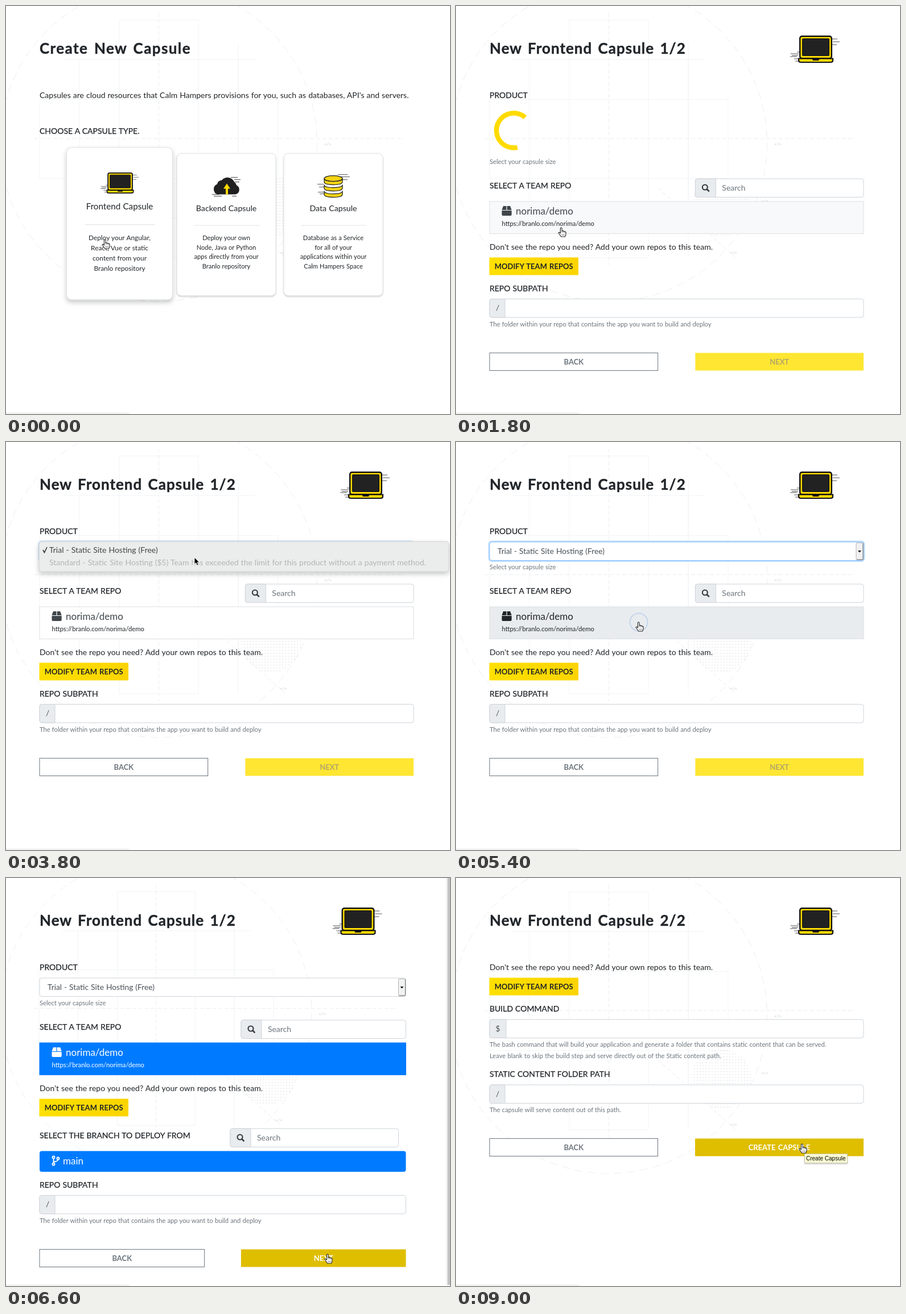
Write an HTML page that moves like this. It is 780 by 718 pixels and loops after 9200 ms.

```html
<!DOCTYPE html>
<html lang="en">
<head>
<meta charset="utf-8">
<title>Create New Capsule</title>
<style>
html, body { margin: 0; width: 100%; height: 100%; overflow: hidden; background: #fff; }
svg { display: block; width: 780px; height: 718px; }
text { font: 14px Lato, sans-serif; word-spacing: .03em; fill: #212529; white-space: pre; }
.title { font-size: 26px; font-weight: 700; word-spacing: 3px; letter-spacing: 1px; stroke: #212529; stroke-width: .4px; }
.wide { letter-spacing: 1.4px; }
.head { font-size: 14px; stroke: #212529; stroke-width: .25px; }
.help { font-size: 11.2px; fill: #6c757d; }
.btn { font-size: 13px; font-weight: 700; word-spacing: 1px; text-anchor: middle; }
.repo { font-size: 17px; }
.url { font-size: 11.3px; }
.field { font-size: 13.8px; fill: #495057; }
.name { font-size: 14.2px; text-anchor: middle; }
.desc { font-size: 11.1px; text-anchor: middle; }
.tip { font: 10px "Liberation Sans", Arial, sans-serif; word-spacing: 0; fill: #000; }
</style>
</head>
<body>
<svg viewBox="0 0 780 718">
  <defs>
    <linearGradient id="gold"><stop stop-color="#ffe000"/><stop offset="1" stop-color="#fbd400"/></linearGradient>
    <pattern id="dots" width="5.2" height="5.2" patternUnits="userSpaceOnUse"><rect x="2" y="2" width="1.2" height="1.2" fill="#cfd1d3"/></pattern>
    <filter id="soft" x="-20%" y="-20%" width="140%" height="140%"><feDropShadow dx="0" dy="1.5" stdDeviation="1.2" flood-opacity=".22"/></filter>
    <filter id="deep" x="-20%" y="-30%" width="140%" height="170%"><feDropShadow dx="0" dy="4" stdDeviation="4" flood-opacity=".22"/></filter>
  </defs>
  <g id="stage"></g>
</svg>
<script>
const LOOP = 9200, STEP = 200, LEFT = 59;
const stage = document.getElementById('stage');

const text = (x, y, s, cls = '', fill = '') =>
  `<text x="${x}" y="${y}" class="${cls}"${fill && ` style="fill:${fill}"`}>${s}</text>`;
const rect = (x, y, w, h, fill, stroke = 'none', r = 0, extra = '') =>
  `<rect x="${x}" y="${y}" width="${w}" height="${h}" rx="${r}" fill="${fill}" stroke="${stroke}" ${extra}/>`;
const path = (d, fill = 'none', stroke = 'none', w = 1) =>
  `<path d="${d}" fill="${fill}" stroke="${stroke}" stroke-width="${w}"/>`;
const at = (x, y, s, body) => `<g transform="translate(${x} ${y}) scale(${s})">${body}</g>`;

// ---- icons, centred on 0,0
const laptop =
  path('M24-18H38M30-13H42M28-8H37M-44 8H-30M-42 11H-31M-45 13H-33M-38 17H-30M-36 21H-28M-33 5H-28', 'none', '#555', 1) +
  rect(-27.8, -22.8, 55.6, 39, '#ffdb00', '#111', 3.5, 'stroke-width="2.4"') +
  rect(-23.5, -18.5, 47, 30, '#222', '#111', 1) +
  path('M-30 16.5H30V19.5Q30 23 26 23H-26Q-30 23-30 19.5Z', '#ffdb00', '#111', 2.2) +
  path('M-7 16H7L5 20H-5Z', '#111');
const cloud =
  path('M8-17H20M14-13H25M15-9H23M-25 13H-12M-22 16H-8M10 16H18M-20 9H-16', 'none', '#444', 1) +
  path('M-15 13A9.5 9.5 0 0 1-16-5A9 9 0 0 1-8-12A13 13 0 0 1 14-9A9 9 0 0 1 18-3A8.5 8.5 0 0 1 16 13Z', '#202020') +
  path('M1-6L7 3H3V13H-1V3H-5Z', '#ffdb00');
const disc = y => path(`M-16 ${y}V${y + 6}Q-16 ${y + 11} 0 ${y + 11}T16 ${y + 6}V${y}Q16 ${y + 5} 0 ${y + 5}T-16 ${y}Z`, '#f5d316', '#222', 1.3);
const database =
  path('M8-21H25M12-17H29M15-12H25M-28-4H-17M-25 1H-16M-27 10H-17M-24 13H-15', 'none', '#555', 1) +
  disc(8) + disc(-3) + disc(-14) +
  '<ellipse cy="-14" rx="16" ry="5" fill="#f5d316" stroke="#222" stroke-width="1.3"/>';
const lens = (x, y) => `<g fill="none" stroke="#343a40" stroke-width="2.1"><circle cx="${x - 1}" cy="${y - 1}" r="4.5"/>${path(`M${x + 2} ${y + 2}l4.4 4.4`, 'none', '#343a40', 2.6)}</g>`;
const box = (y, c) => path(`M83 ${y}H88.5V${y + 7}H80.5ZM89.7 ${y}H95.2L97.7 ${y + 7}H89.7ZM80.5 ${y + 8}H97.7V${y + 15}Q97.7 ${y + 17} 96 ${y + 17}H82.5Q80.5 ${y + 17} 80.5 ${y + 15}Z`, c);
const fork = '<g fill="none" stroke="#fff" stroke-width="1.8"><circle cx="83.5" cy="491.5" r="2"/><circle cx="83.5" cy="503.5" r="2"/><circle cx="91.5" cy="493.5" r="2"/><path d="M83.5 493.5V501.5M91.5 495.5Q91.5 498.5 84 499.5"/></g>';
const hand = path('M-1.6 1.3A1.35 1.35 0 0 1 1.1 1.3V6Q3.2 5 3.7 6.4Q5.7 5.8 6 7.1Q8 6.8 8 8.3V11.2Q8 13.4 6.5 16H-.5Q-2.4 12.6-4.7 10Q-5.4 8.1-3.6 8.2L-1.6 9.8Z', '#fff', '#222', 1.1) +
  path('M1.1 6V9M3.7 6.5V9.3M6 7.2V9.5M1 11.5V14M3 11.5V14M5 11.5V14', 'none', '#444', .7);
const arrow = path('M0 0V12.2L2.8 9.7L4.8 14.2L7 13.2L5 8.9H8.8Z', '#000', '#fff', .9);

// ---- page furniture
const tag = (x, y) => `<text x="${x}" y="${y}" style="font-size:8px;fill:#c8cbce">&lt;/&gt;</text>`;
const backdrop = s => at(0, 0, s,
  '<circle cx="268" cy="241.5" r="278.5" fill="none" stroke="#eceeef" stroke-dasharray="14 9"/>' +
  '<g fill="none" stroke="#f2f4f5">' +
  '<path d="M199 24.5H338V443H199ZM59 164.5H478V303.5H59ZM129 94V373H408V64M100 94.5H438M408 94V443"/>' +
  '<path d="M268.5 12V456M50 233.5H700M355 320L490 442" stroke-dasharray="7 4" stroke="#eceeef"/></g>' +
  '<circle cx="466" cy="353" r="53" fill="url(#dots)"/>' +
  tag(559, 246) + tag(536, 346) + tag(481, 437));
const button = (x, y, w, label, fill, color, stroke) =>
  rect(x, y, w, 31, fill, stroke) + text(x + w / 2, y + 20.5, label, 'btn', color);
const teamRepos = y => text(LEFT, y, "Don't see the repo you need? Add your own repos to this team.") +
  rect(58.5, y + 13.5, 156.5, 31, 'url(#gold)') + text(136.7, y + 33.5, 'MODIFY TEAM REPOS', 'btn');
const addon = (x, y, w, h = 32.5) =>
  path(`M${x + w} ${y}H${x + 4}Q${x} ${y} ${x} ${y + 4}V${y + h - 4}Q${x} ${y + h} ${x + 4} ${y + h}H${x + w}Z`, '#e9ecef', '#ced4da');
const input = (y, w, sign, aw) => rect(LEFT, y, w, 32.5, '#fff', '#ced4da', 4) + addon(LEFT, y, aw) +
  text(LEFT + aw / 2 - (sign === '$' ? 4 : 2.5), y + 20.5, sign, 'field');
const search = (x, y, w) => rect(x, y, w, 32.5, '#fff', '#ced4da', 4) + addon(x, y, 36) + lens(x + 18, y + 16) +
  text(x + 47, y + 20.5, 'Search', '', '#6c757d');

// ---- screens
const card = (x, icon, name, lines, hover) =>
  at(hover ? 199.5 : x + 87, hover ? 383 : 384.6, hover ? 1.069 : 1,
    rect(-87, -125.3, 174, 250.5, '#fff', '#dcdfe1', 8, `filter="url(#${hover ? 'deep' : 'soft'})"`) +
    icon + text(0, -23.5, name, 'name') + path('M-57 1.5H58', 'none', '#e3e5e7') +
    lines.map((s, i) => text(0, 27.5 + i * 16.7, s, 'desc')).join(''));

const chooseScreen = () =>
  text(LEFT, 84, 'Create New Capsule', 'title wide') +
  text(LEFT, 162, "Capsules are cloud resources that Calm Hampers provisions for you, such as databases, API's and servers.") +
  text(LEFT, 224.5, 'CHOOSE A CAPSULE TYPE.', 'head') +
  card(300, at(0, -66, 1, cloud), 'Backend Capsule', ['Deploy your own', 'Node, Java or Python', 'apps directly from your', 'Branlo repository']) +
  card(488, at(0, -67, 1, database), 'Data Capsule', ['Database as a Service', 'for all of your', 'applications within your', 'Calm Hampers Space']) +
  card(113, at(1, -67, .72, laptop), 'Frontend Capsule', ['Deploy your Angular,', 'React, Vue or static', 'content from your', 'Branlo repository'], true);

function spinner(t) {
  const a = 78 + (t - 1800) * .36, p = d => {
    const r = d * Math.PI / 180;
    return `${101.5 + 30.5 * Math.cos(r)} ${219 + 30.5 * Math.sin(r)}`;
  };
  return path(`M${p(a)}A30.5 30.5 0 1 1 ${p(a + 233)}`, 'none', '#ffdb00', 8.5);
}

function select(w, focus) {
  const r = LEFT + w;
  return (focus ? rect(LEFT - 1, 175, w + 2, 34.5, 'none', '#bfdfff', 5, 'stroke-width="3"') : '') +
    rect(LEFT, 176, w, 32.5, '#fff', focus ? '#80bdff' : '#ced4da', 4) +
    text(73, 196.5, 'Trial - Static Site Hosting (Free)', 'field') +
    rect(r - 13, 177.5, 12, 29.5, '#f1f1f1', '#b5b5b5', 1) + path(`M${r - 1} 178V207H${r - 12}`, 'none', '#777') +
    path(`M${r - 10} 191h6l-3 3.5Z`, '#111');
}

const menu = () => rect(58, 175, 720, 53, '#ebecec', '#d0d0d0', 5, 'filter="url(#deep)"') +
  path('M65 190l2.5 4.5L72 185', 'none', '#333', 1.6) +
  text(76, 194.5, 'Trial - Static Site Hosting (Free)', '', '#444') +
  text(76, 217, 'Standard - Static Site Hosting ($5) Team has exceeded the limit for this product without a payment method.', '', '#b3b4b5');

function formScreen(t, s) {
  const { w, dy, branch, rowHover, nextHover } = s, half = w * .45, right = LEFT + w;
  const pressed = t === 5400;
  const ink = branch ? '#fff' : pressed ? '#212529' : '#3f454a';
  const rowFill = branch ? '#007bff' : pressed ? '#e9ecef' : rowHover ? '#f8f9fa' : '#fff';
  const end = branch ? 97 : dy;
  return text(LEFT, 84, 'New Frontend Capsule 1/2', 'title') + at(right - 84, 76, 1, laptop) +
    text(LEFT, 162, 'PRODUCT', 'head') +
    (dy ? spinner(t) : select(w, t >= 3200 && !branch)) +
    text(LEFT, 223.5 + dy, 'Select your capsule size', 'help') +
    text(LEFT, 267 + dy, 'SELECT A TEAM REPO', 'head') +
    search(right - half, 250 + dy, half) +
    rect(LEFT, 290 + dy, w, 56.5, rowFill, branch ? '#007bff' : '#dcdfe2') +
    box(298 + dy, ink) + text(105, 313 + dy, 'norima/demo', 'repo', ink) +
    text(80.5, 332.5 + dy, 'https://branlo.com/norima/demo', 'url', branch ? '#fff' : '') +
    teamRepos(375 + dy) +
    (branch ? text(LEFT, 457.5, 'SELECT THE BRANCH TO DEPLOY FROM', 'head') + search(394, 441, 295.5) +
      rect(LEFT, 480.5, w, 36.5, '#007bff', 'none', 4) + fork + text(100, 504, 'main', 'repo', '#fff') : '') +
    text(LEFT, 448 + end, 'REPO SUBPATH', 'head') +
    input(461.5 + end, w, '/', 27) +
    text(LEFT, 509.5 + end, 'The folder within your repo that contains the app you want to build and deploy', 'help') +
    button(LEFT, 556.5 + end, half, 'BACK', '#fff', '#6c757d', '#6c757d') +
    button(right - half, 556.5 + end, half, 'NEXT', nextHover ? '#dfbe00' : branch ? 'url(#gold)' : '#fee632', nextHover ? '#fff' : branch ? '#212529' : '#b3a668') +
    (t >= 3400 && t < 4600 ? menu() : '');
}

const buildScreen = (t, hover) =>
  text(LEFT, 84, 'New Frontend Capsule 2/2', 'title') + at(632, 76, 1, laptop) +
  teamRepos(162) +
  text(LEFT, 235, 'BUILD COMMAND', 'head') + input(249, 657, '$', 29) +
  text(LEFT, 297, 'The bash command that will build your application and generate a folder that contains static content that can be served.', 'help') +
  text(LEFT, 317, 'Leave blank to skip the build step and serve directly out of the Static content path.', 'help') +
  text(LEFT, 350, 'STATIC CONTENT FOLDER PATH', 'head') + input(364, 657, '/', 27) +
  text(LEFT, 411.5, 'The capsule will serve content out of this path.', 'help') +
  button(LEFT, 458.5, 295.5, 'BACK', '#fff', '#6c757d', '#6c757d') +
  button(420, 458.5, 296, 'CREATE CAPSULE', hover ? '#dfbe00' : 'url(#gold)', hover ? '#fff' : '#212529') +
  (t >= 8800 ? rect(612.5, 485.5, 75, 16, '#fcfbd2', '#c9c9b8', 0, 'filter="url(#soft)"') + text(615, 497, 'Create Capsule', 'tip') : '');

// ---- pointer: time, x, y
const track = [[0, 174, 411], [1200, 174, 411], [1600, 185, 390], [2000, 185, 390], [2800, 331, 203], [4000, 331, 203],
  [4200, 329, 192], [4600, 329, 192], [5200, 321, 317], [5600, 321, 317], [6400, 565, 662], [7400, 565, 662],
  [7600, 565, 659], [8000, 565, 659], [8400, 608, 468], [LOOP, 608, 468]];
const clicks = [1000, 3200, 4400, 5400, 7400];

function pointer(t) {
  const i = track.findIndex(k => k[0] > t), a = track[i - 1], b = track[i];
  const u = (t - a[0]) / (b[0] - a[0]), e = u * u * (3 - 2 * u);
  return [a[1] + (b[1] - a[1]) * e, a[2] + (b[2] - a[2]) * e];
}

function ring(t, x, y) {
  const age = clicks.map(c => t - c).find(d => d >= 0 && d <= STEP);
  if (age === undefined) return '';
  return `<circle cx="${x}" cy="${y}" r="${age ? 28.5 : 15.5}" fill="none" stroke="${age ? '#b4cce6' : '#c4d6ee'}" stroke-width="${age ? 1 : 2}"/>`;
}

function scene(t) {
  const [x, y] = pointer(t);
  const choose = t < 1200, build = t >= 7600, form = !choose && !build;
  const branch = form && t >= 5600, dy = form && t < 2400 ? 54 : 0;
  const rowHover = form && y > 290 + dy && y < 346 + dy;
  const nextHover = branch && y > 654 && x > 413;
  const createHover = build && y > 458 && y < 490;
  const w = branch ? 643.5 : 657;
  const page = choose ? chooseScreen() : build ? buildScreen(t, createHover) : formScreen(t, { w, dy, branch, rowHover, nextHover });
  const bar = branch ? rect(772, 0, 8, 718, '#f7f7f7') + rect(775.5, 0, 4.5, 716, '#c3c3c3') : '';
  return backdrop(branch ? .9825 : 1) + page + bar +
    path('M0 715.5H212Q217 715.5 218 718H0Z', '#f0f0f0') +
    ring(t, x, y) + at(x, y, 1, choose || rowHover || nextHover || createHover ? hand : arrow);
}

let last = -1;
function tick(now) {
  const t = Math.floor(now % LOOP / STEP) * STEP;
  if (t !== last) stage.innerHTML = scene(last = t);
  requestAnimationFrame(tick);
}
tick(performance.now());
</script>
</body>
</html>
```
